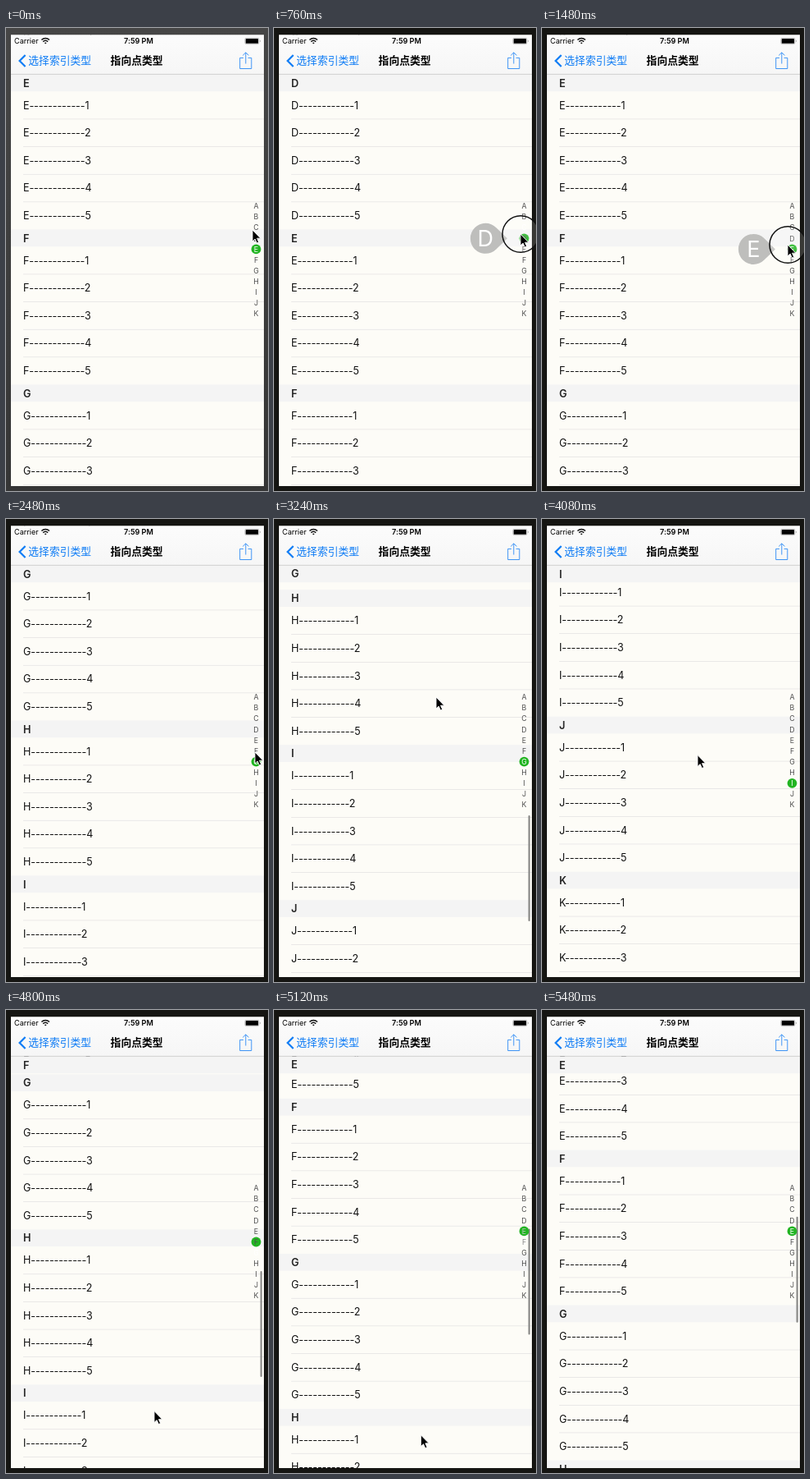
An HTML page that plays this animation: 320 px wide and 564 px high, repeating every 5.52 s.

```html
<!DOCTYPE html>
<html lang="zh">
<head>
<meta charset="utf-8">
<title>指向点类型</title>
<style>
  html, body { margin: 0; width: 100%; height: 100%; overflow: hidden; background: #151512; }
  svg { display: block; width: 320px; height: 564px; }
  text { font-family: Inter, Roboto, sans-serif; font-feature-settings: "calt" 0; }
  .row { font-size: 12.6px; letter-spacing: -.13px; fill: #111; }
  .head { font-size: 12.7px; font-weight: 600; fill: #222; }
  .mid { text-anchor: middle; }
  .zh { font-family: "Noto Sans CJK SC", "Noto Sans CJK", sans-serif; font-size: 12.8px; }
</style>
</head>
<body>
<svg id="stage" viewBox="0 0 320 564">
  <defs>
    <clipPath id="screen"><rect x="6" y="8.5" width="309" height="549.5"/></clipPath>
    <linearGradient id="idle" x1="0" y1="0" x2="0" y2="1">
      <stop offset="0" stop-color="#464646"/><stop offset="1" stop-color="#353535"/>
    </linearGradient>
    <linearGradient id="bar" x1="0" y1="0" x2="0" y2="1">
      <stop offset="0" stop-color="#fcfcfc"/><stop offset="1" stop-color="#f6f6f6"/>
    </linearGradient>
  </defs>
  <rect id="bezel" width="320" height="564"/>
  <g clip-path="url(#screen)">
    <rect x="6" y="8" width="309" height="551" fill="#fdfcf7"/>
    <g id="list"></g>
    <rect id="thumb" x="310.6" width="2.1" height="129" rx="1" fill="#878785"/>
    <g id="index"></g>
    <g id="bubble">
      <path d="M13.1-13.1A18.5 18.5 0 1 0 13.1 13.1L26.6 0Z" fill="#bebebc"/>
      <text id="bubbleText" class="mid" y="9.8" font-size="27" fill="#fff"></text>
    </g>
    <rect x="6" y="8" width="309" height="48.3" fill="url(#bar)"/>
    <rect x="6" y="55.9" width="309" height=".6" fill="#b5b5b5"/>
  </g>
  <text x="10" y="19.3" font-size="9.1">Carrier</text>
  <g fill="none" stroke="#111" stroke-width="1.5">
    <path d="M43.4 14.5a7 7 0 0 1 9.6 0M45.2 16.6a4.5 4.5 0 0 1 6 0"/>
    <path d="M46.8 18.1L48.2 19.6 49.6 18.1Q48.2 17 46.8 18.1Z" fill="#111" stroke="none"/>
  </g>
  <text class="mid" x="162" y="19.3" font-size="9.1" font-weight="600">7:59 PM</text>
  <rect x="291.9" y="12.2" width="17" height="7.4" rx="1.6" fill="#fff" stroke="#999" stroke-width=".6"/>
  <rect x="292.7" y="13" width="15.4" height="5.8" rx=".9"/>
  <path d="M310 14.5q1.4 1.4 0 2.8z" fill="#777"/>
  <path d="M23.6 33L16.6 40 23.6 47" fill="none" stroke="#0f7cf5" stroke-width="2.2"/>
  <text class="zh" x="27.3" y="44.2" fill="#0f7cf5">选择索引类型</text>
  <text class="zh mid" x="159.6" y="44.2" font-weight="700">指向点类型</text>
  <path d="M290 36.4H285.7V49.5H299.8V36.4H295.6M292.8 43.5V30M289.2 33.4L292.8 29.8 296.4 33.4"
        fill="none" stroke="#2a8af5" stroke-width=".9"/>
  <circle id="ring" r="22.3" fill="#fff" fill-opacity=".15" stroke="#111" stroke-width="1.5"/>
  <path id="cursor" d="M0 0V14L3.2 11.1 5.4 16 7.7 15 5.5 10.2H9.9Z"
        fill="#000" stroke="#fff" stroke-width=".9"/>
</svg>
<script>
const LOOP = 5520, STEP = 40;
const TOP = 56.5, ROW = 33.64, HEAD = 20.8, SECTION = 5 * ROW + HEAD;
const LETTERS = [..."ABCDEFGHIJK"];
const MAX_SCROLL = LETTERS.length * SECTION - 501.5;
const FADE_STEPS = 3;
const $ = id => document.getElementById(id);

function add(parent, tag, attrs, text) {
  const el = document.createElementNS("http://www.w3.org/2000/svg", tag);
  for (const k in attrs) el.setAttribute(k, attrs[k]);
  if (text) el.textContent = text;
  parent.append(el);
  return el;
}
const move = (el, x, y) => el.setAttribute("transform", `translate(${x.toFixed(2)} ${y.toFixed(2)})`);
const indexY = i => 217 + 13.1 * i;

const sections = LETTERS.map(letter => {
  const body = add($("list"), "g", {});
  for (let r = 0; r < 5; r++) {
    const y = HEAD + r * ROW;
    add(body, "text", { class: "row", x: 21, y: y + ROW / 2 + 4.4 }, letter + "-".repeat(12) + (r + 1));
    if (r < 4) add(body, "rect", { x: 21, y: y + ROW - .3, width: 294, height: .6, fill: "#dddcde" });
  }
  const head = add(body, "g", {});
  add(head, "rect", { x: 6, width: 309, height: HEAD, fill: "#f4f4f4" });
  add(head, "text", { class: "head", x: 21, y: 15 }, letter);
  return { body, head };
});

const marks = LETTERS.map((letter, i) => {
  const dot = add($("index"), "circle", { cx: 305.5, cy: indexY(i), r: 5.9, fill: "#22b422" });
  const label = add($("index"), "text", { class: "mid", x: 305.5, y: indexY(i) + 3.2, "font-size": 8.8 }, letter);
  return { dot, label };
});

// Each key is [time, ...values]; values in between are linear.
function track(keys, t) {
  const i = keys.findIndex(k => k[0] > t);
  if (i < 0) return keys[keys.length - 1].slice(1);
  if (i === 0) return keys[0].slice(1);
  const a = keys[i - 1], b = keys[i], p = (t - a[0]) / (b[0] - a[0]);
  return a.slice(1).map((v, n) => v + (b[n + 1] - v) * p);
}

const picks = [[0, 4], [300, 2], [760, 3], [1200, 4], [1720, 5], [2080, 6]];
const drags = [
  { start: 3040, end: 3180, from: 6 * SECTION, to: 1204, rest: 1519, tau: 180, y: 287 },
  { start: 4360, end: 4672, from: 1519, to: 1317, rest: 812, tau: 246, y: 287 }
];
const path = [
  [0, 301, 246], [560, 301, 247], [760, 301, 251], [1040, 301, 257], [1160, 301, 258],
  [1240, 300, 263.5], [1480, 300, 264], [1720, 302, 276.5], [2080, 304, 290],
  [2240, 304, 290], [2400, 304, 284], [2700, 304, 284], [3000, 200, 287], [3040, 200, 287],
  [3180, 198, 217], [3400, 198, 217], [4000, 190, 287.5], [4360, 190, 287.5],
  [4672, 181, 488.5], [4960, 181, 488.5], [5440, 176, 576]
];
const thumbFade = [[3000, 0], [3080, 1], [3880, 1], [4040, 0], [4340, 0], [4420, 1]];
const bubbleFade = [[280, 0], [400, 1], [2320, 1], [2470, 0]];

const activeDrag = t => drags.find(d => t >= d.start && t <= d.end);

function scrollAt(t) {
  const d = drags.filter(d => t >= d.start).pop();
  if (!d) return SECTION * (picks.filter(p => p[0] <= t).pop() || picks[0])[1];
  if (t <= d.end) {
    const p = (t - d.start) / (d.end - d.start);
    return d.from + (d.to - d.from) * p * p;
  }
  return d.rest + (d.to - d.rest) * Math.exp((d.end - t) / d.tau);
}
const selectedAt = t => Math.floor(scrollAt(t) / SECTION + 1e-6);

function draw(t) {
  const scroll = scrollAt(t), selected = selectedAt(t);

  sections.forEach(({ body, head }, i) => {
    const y = TOP + i * SECTION - scroll;
    move(body, 0, y);
    move(head, 0, Math.max(0, Math.min(TOP - y, SECTION - HEAD)));
  });

  // The dot jumps, while the label colour follows over the next few steps.
  const recent = Array.from({ length: FADE_STEPS }, (_, k) => selectedAt(t - (k + 1) * STEP));
  marks.forEach(({ dot, label }, i) => {
    dot.setAttribute("opacity", i === selected ? 1 : 0);
    const v = Math.round(80 + 175 * recent.filter(s => s === i).length / FADE_STEPS);
    label.setAttribute("fill", `rgb(${v},${v},${v})`);
  });

  move($("thumb"), 0, TOP - 1 + scroll / MAX_SCROLL * 372.5);
  $("thumb").setAttribute("opacity", track(thumbFade, t)[0]);
  move($("bubble"), 258.3, indexY(selected));
  $("bubble").setAttribute("opacity", track(bubbleFade, t)[0]);
  $("bubbleText").textContent = LETTERS[selected];
  $("bezel").setAttribute("fill", t < 300 ? "url(#idle)" : "#151512");

  const drag = activeDrag(t);
  let [x, y] = track(path, t);
  if (drag) y = drag.y + drag.from - scroll;
  move($("cursor"), x, y);
  move($("ring"), x + .3, y);
  $("ring").setAttribute("opacity", drag || (t >= 300 && t < 2260) ? 1 : 0);
}

function tick() {
  draw(Math.floor(performance.now() % LOOP / STEP) * STEP);
  requestAnimationFrame(tick);
}
tick();
</script>
</body>
</html>
```
